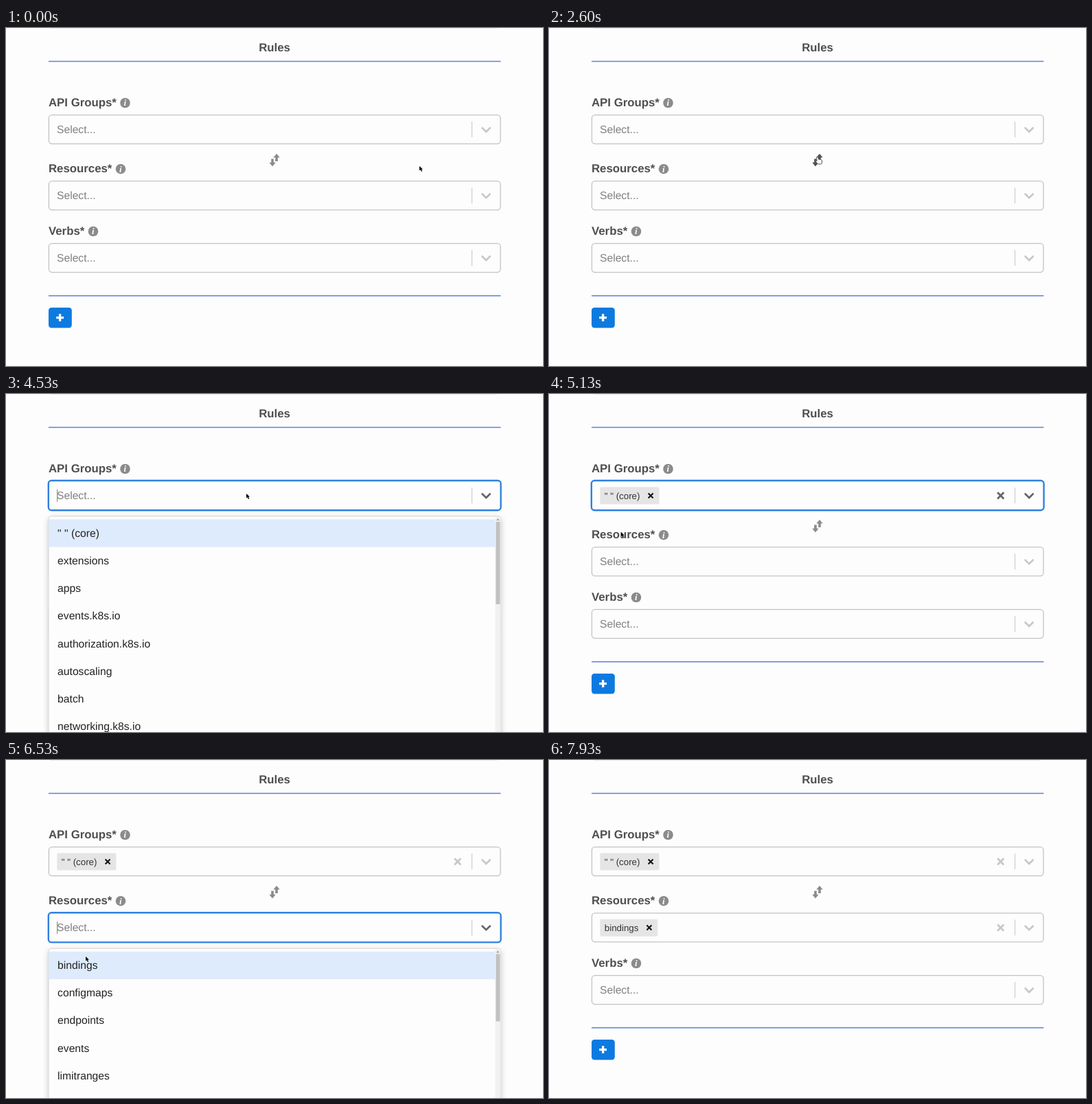
Animation, 782 px wide and 492 px high, one loop 8000 ms. Source, as an HTML page:

```html
<!DOCTYPE html>
<html lang="en">
<head>
<meta charset="utf-8">
<title>Rules form</title>
<style>
  html, body { margin: 0; width: 100%; height: 100%; overflow: hidden; background: #fdfdfd; }
  svg { display: block; width: 782px; height: 492px; font: 15.68px "Liberation Sans", Arial, sans-serif; text-rendering: geometricPrecision; }
  .bold { font-weight: bold; font-size: 16.8px; fill: #4f4f4f; }
  .info { font: italic bold 13px "Liberation Serif", serif; fill: #fff; text-anchor: middle; }
  .chip { font-size: 13.33px; fill: #333; }
</style>
</head>
<body>
<svg id="stage" viewBox="0 0 782 492"></svg>
<script>
const LOOP = 8000, STEPS = 120, STEP = LOOP / STEPS;
const stage = document.getElementById('stage');

const groups = ['" " (core)', 'extensions', 'apps', 'events.k8s.io', 'authorization.k8s.io',
  'autoscaling', 'batch', 'networking.k8s.io'];
const resources = ['bindings', 'configmaps', 'endpoints', 'events', 'limitranges', 'namespaces'];

// Pointer stops: time, x, y
const path = [
  [0, 602, 201], [735, 470, 214], [985, 470, 214], [1735, 393, 191], [1850, 393, 191],
  [2600, 390, 187], [2785, 390, 187], [3270, 364, 161], [3400, 364, 161], [3800, 350, 145],
  [4535, 350, 145], [4860, 118, 201], [4990, 118, 201], [5540, 40, 201], [5790, 40, 201],
  [6140, 112, 244], [6270, 112, 244], [6535, 116, 286], [6670, 116, 295], [6930, 116, 295],
  [7465, 33, 291], [7690, 33, 291], [7930, -14, 300]
];
const clicks = [4060, 4930, 5600, 6195, 6800, 7600];

const between = (t, a, b) => t >= a && t < b;
const rect = (x, y, w, h, attrs) => `<rect x="${x}" y="${y}" width="${w}" height="${h}" ${attrs}/>`;
const shape = (d, attrs) => `<path d="${d}" ${attrs}/>`;
const text = (x, y, s, attrs) => `<text x="${x}" y="${y}" ${attrs}>${s}</text>`;
const cross = (x, y, r, color) =>
  shape(`M${x - r} ${y - r}l${2 * r} ${2 * r}m0 ${-2 * r}l${-2 * r} ${2 * r}`, `stroke="${color}" stroke-width="${r * .6}"`);

function pointerAt(t) {
  const i = path.findIndex(stop => stop[0] > t);
  if (i < 0) return path[path.length - 1].slice(1);
  const [t0, x0, y0] = path[i - 1], [t1, x1, y1] = path[i];
  const p = (t - t0) / (t1 - t0), e = p * p * (3 - 2 * p);
  return [x0 + (x1 - x0) * e, y0 + (y1 - y0) * e];
}

function label(s, y, iconX) {
  return text(62, y, s, 'class="bold"') +
    `<circle cx="${iconX}" cy="${y - 4.8}" r="7.3" fill="#8b8b8b"/>` +
    text(iconX - .2, y - .4, 'i', 'class="info"');
}

function select(y, { focus, fading, value, chipWidth, caret } = {}) {
  const mid = y + 21.2, dark = focus ? '#666' : '#c8c8c8';
  const border = !focus ? 'stroke="#c3c3c3" stroke-width="1.3"'
    : `stroke="${fading ? '#5290e4' : '#2f80e2'}" stroke-width="${fading ? 2 : 2.4}"`;
  const grow = focus ? .6 : 0;
  const content = value
    ? rect(74.3, y + 9, chipWidth, 25, 'rx="2" fill="#e5e5e5"') +
      text(80.8, mid + 5, value, 'class="chip"') +
      cross(74.3 + chipWidth - 12.4, mid + .1, 3.5, '#111') + cross(657.7, mid + .1, 4.6, dark)
    : text(74, mid + 5.2, 'Select...', 'fill="#808080"') +
      (caret ? rect(74.2, mid - 9, 1, 18, 'fill="#777"') : '');
  return rect(62.4 - grow, y - grow, 657.6 + 2 * grow, 42 + 2 * grow, `rx="4.5" fill="#fdfdfd" ${border}`) +
    content +
    rect(677.9, y + 9.6, 1.2, 23, 'fill="#ccc"') +
    shape(`M693.6 ${mid - 2.3}l5.6 5.5 5.6-5.5`, `fill="none" stroke="${dark}" stroke-width="2.7" stroke-linecap="round"`);
}

function menu(y, items, thumbHeight) {
  const first = y + 4.4, row = 40.27;
  return rect(62, y, 658.6, 336, 'rx="4" fill="#fdfdfd" stroke="#d8d8d8" style="filter:drop-shadow(0 3px 4px #0003)"') +
    rect(712.4, y + 1, 8, 334, 'fill="#f1f1f1"') +
    shape(`M714 ${y + 6}l2.3-2.8 2.3 2.8z`, 'fill="#a0a0a0"') +
    rect(713.4, y + 8, 6, thumbHeight, 'fill="#c1c1c1"') +
    rect(62, first, 650.4, row, 'fill="#deebfc"') +
    items.map((s, i) => text(75.1, first + 25.1 + i * row, s, 'fill="#222"')).join('');
}

const swapIcon = hover => shape(
  'M394 183l4.7 5.6h-2.9v5.4h-3.6v-5.4h-2.9zM388 201.4l-4.7-5.6h2.9v-5.4h3.6v5.4h2.9z',
  `fill="${hover ? '#505050' : '#8b8b8b'}"`);

function pointer(x, y, hand) {
  return hand
    ? shape(`M${x - .5} ${y + 1}q1.4-1 2 .5l1 2.6 3.4.4 1.6 1.1v3.4l-1 2h-5l-3.6-4.1q.2-1.6 2.2-.2z`,
      'fill="#fff" stroke="#444" stroke-width=".9" stroke-linejoin="round"')
    : shape(`M${x} ${y}v6.6l1.6-1.4 1.3 2.8 1.3-.6-1.2-2.6h2z`,
      'fill="#000" stroke="#fff" stroke-width=".8" paint-order="stroke"');
}

function ring(t, x, y) {
  const age = t - clicks.findLast(c => c <= t);
  return age < 190
    ? `<circle cx="${x + 2}" cy="${y + 2.5}" r="35.7" fill="none" stroke="#e8384f" stroke-width="4.6" opacity="${age < 100 ? .72 : .4}"/>`
    : '';
}

function scene(t) {
  const [x, y] = pointerAt(t);
  const groupMenu = between(t, 4130, 4990), resourceMenu = between(t, 6260, 6860);
  const blink = opened => (t - opened) % 1000 < 530;
  const hover = !groupMenu && !resourceMenu && Math.abs(x - 391) < 8 && Math.abs(y - 192) < 10;
  return rect(0, 0, 782, 492, 'fill="#fdfdfd"') +
    rect(65, 0, 650, .8, 'fill="#e8e8e8"') +
    text(391, 34.2, 'Rules', 'class="bold" text-anchor="middle"') +
    rect(62, 47.8, 658.4, 1.5, 'fill="#5a82d6"') +
    rect(62, 389, 658.4, 1.5, 'fill="#5a82d6"') +
    label('API Groups*', 113.8, 173.5) +
    select(126.6, {
      focus: between(t, 4130, 5730), fading: t >= 5590,
      value: t >= 4990 && groups[0], chipWidth: 86.2, caret: groupMenu && blink(4130)
    }) +
    swapIcon(hover) +
    label('Resources*', 210, 167) +
    select(222.8, {
      focus: between(t, 6260, 7730), fading: t >= 7590,
      value: t >= 6860 && resources[0], chipWidth: 84, caret: resourceMenu && blink(6260)
    }) +
    label('Verbs*', 300.8, 127) +
    select(313.6) +
    rect(62, 407, 33.8, 29.4, 'rx="4.2" fill="#0d7ae0"') +
    shape('M73.2 421.7h10.8M78.6 416.3v10.8', 'stroke="#fff" stroke-width="3.3"') +
    (groupMenu ? menu(178, groups, 120) : '') +
    (resourceMenu ? menu(274.4, resources, 98) : '') +
    ring(t, x, y) +
    (t < 7920 ? pointer(x, y, hover) : '');
}

const start = performance.now();
let lastStep = -1;

function draw() {
  // The small lead keeps times rounded to 10 ms on the right step.
  const step = Math.floor((performance.now() - start + 7) / STEP) % STEPS;
  if (step !== lastStep) {
    lastStep = step;
    stage.innerHTML = scene(step * STEP);
  }
  requestAnimationFrame(draw);
}
draw();
</script>
</body>
</html>
```
